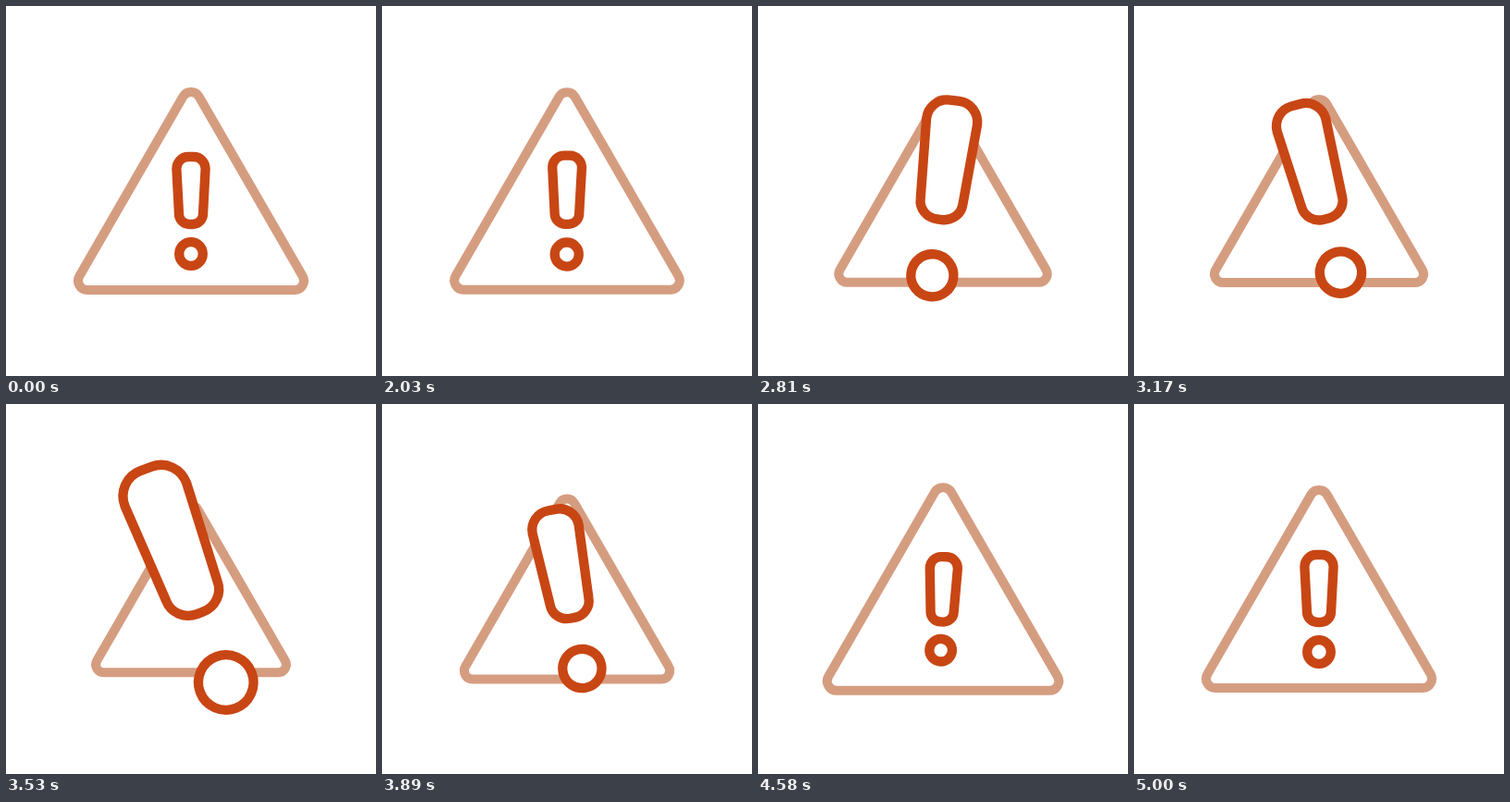
Recreate the animation shown at these times as an HTML page. Size 400x400 px, loop 5060 ms.

```html
<!DOCTYPE html>
<html lang="en">
<head>
<meta charset="utf-8">
<title>Warning</title>
<style>
  html, body { margin: 0; width: 100%; height: 100%; overflow: hidden; background: #fff; }
  svg { display: block; width: 100%; height: 100%; }
  svg * { vector-effect: non-scaling-stroke; }
  #sign { fill: none; stroke: #d59d80; stroke-width: 10; }
  #mark { fill: #fff; stroke: #c84614; stroke-width: 10.3; }
</style>
</head>
<body>
<svg viewBox="0 0 400 400">
  <path id="sign" d="M191.34 98A10 10 0 0 1 208.66 98L320.66 292A10 10 0 0 1 312 307H88A10 10 0 0 1 79.34 292Z"/>
  <g id="mark">
    <path id="bar" d="M184.4 176A12.6 13 0 0 1 197 163H203A12.6 13 0 0 1 215.6 176L213 225A11.5 11 0 0 1 201.5 236H198.5A11.5 11 0 0 1 187 225Z"/>
    <circle id="dot" cx="200" cy="268" r="12.8"/>
  </g>
</svg>
<script>
  const LOOP = 5060, START = 2000, END = 5000, STEP = 30;
  const [sign, mark, bar, dot] = ['sign', 'mark', 'bar', 'dot'].map(id => document.getElementById(id));

  // Smooth rise from 0 to 1 between two times
  function ramp(t, from, to) {
    const p = Math.min(1, Math.max(0, (t - from) / (to - from)));
    return (1 - Math.cos(Math.PI * p)) / 2;
  }

  // Shrinks, breathes out, shrinks again, overshoots, settles
  const signScale = t => 1
    - .15 * ramp(t, 2000, 2400) + .093 * ramp(t, 2400, 2990)
    - .12 * ramp(t, 2990, 3730) + .3 * ramp(t, 3730, 4170)
    - .123 * ramp(t, 4170, 4760);

  // Swells twice with a dip between, undershoots, settles
  const markGrowth = t => 1.35 * ramp(t, 2000, 2400)
    - .71 * (ramp(t, 2400, 3000) - ramp(t, 3000, 3600))
    - 1.475 * ramp(t, 3600, 4200) + .125 * ramp(t, 4200, 4800);

  // Leans right, swings left, tips back upright
  const markAngle = t => 20 * ramp(t, 2000, 2450) - 40.5 * ramp(t, 2450, 3400)
    + 25.8 * ramp(t, 3600, 4290) - 5.3 * ramp(t, 4290, 4800);

  const scaled = (s, dy = 0) => `translate(200 ${200 + dy}) scale(${s}) translate(-200 -200)`;
  const place = (el, transform) => el.setAttribute('transform', transform);

  function draw(time) {
    const steps = Math.max(0, Math.floor((time - START) / STEP));
    const t = Math.min(END, START + steps * STEP);
    const growth = markGrowth(t);
    const lift = growth * (growth > 0 ? -38 : -20);

    place(sign, scaled(signScale(t)));
    place(mark, `rotate(${markAngle(t)} 200 200)`);
    place(bar, scaled(1 + .965 * growth, 1.08 * lift));
    place(dot, scaled(1 + growth, lift));
  }

  const begin = performance.now();
  function tick() {
    draw((performance.now() - begin) % LOOP);
    requestAnimationFrame(tick);
  }
  tick();
</script>
</body>
</html>
```
